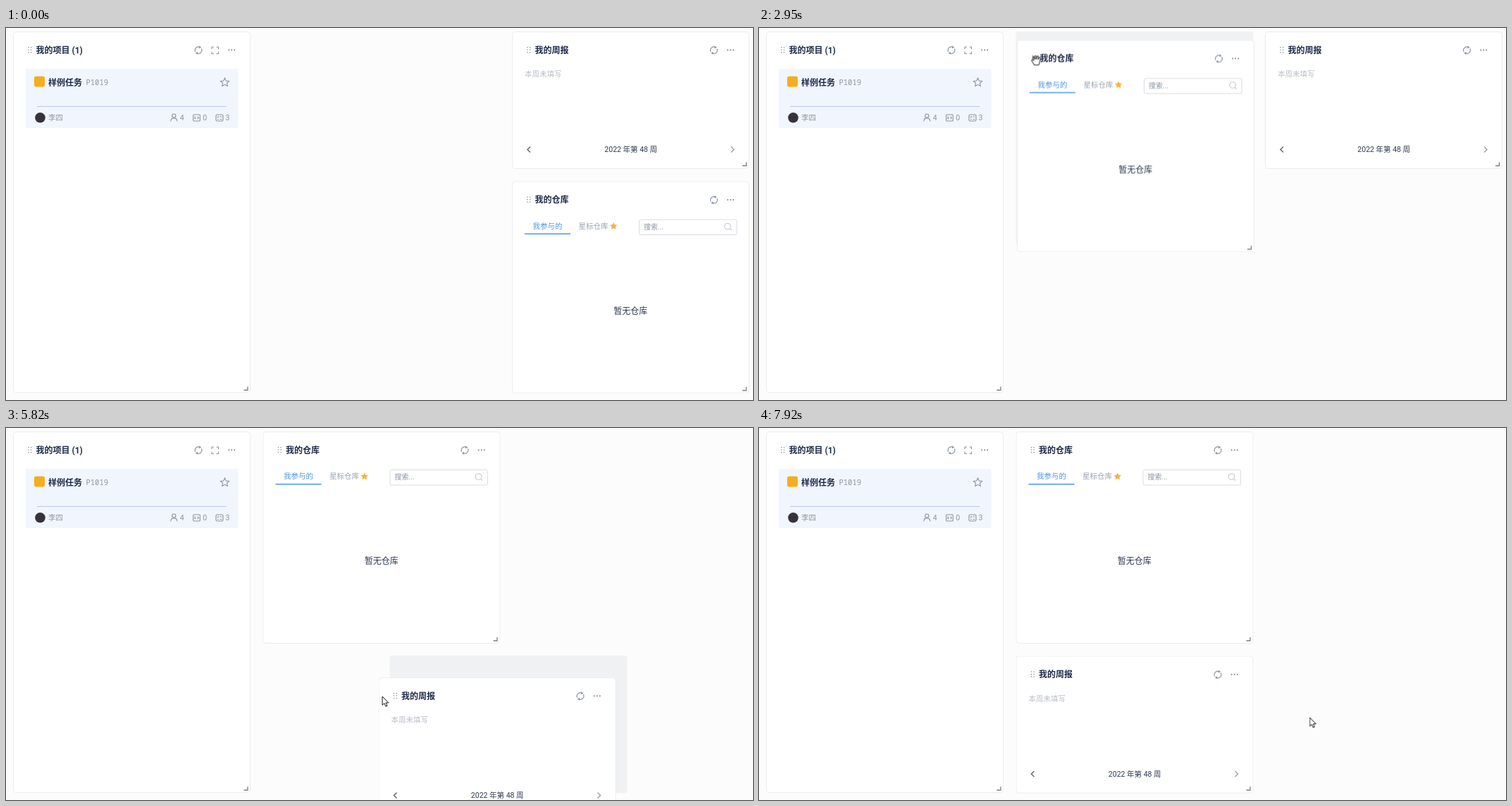
An HTML page for the animation above (8 s loop, 1060 px wide and 528 px high).

```html
<!DOCTYPE html>
<html lang="zh-CN">
<head>
<meta charset="utf-8">
<title>工作台</title>
<style>
html, body { margin: 0; width: 100%; height: 100%; overflow: hidden; background: #fcfcfc; }
body { position: relative; font: 10.5px Roboto, "Noto Sans CJK SC", "Noto Sans CJK", sans-serif; }
svg.card, .ghost, .cursor { position: absolute; left: 0; top: 0; overflow: visible; }
.card { z-index: 1; fill: none; }
.panel { fill: #fff; stroke: #ebecef; }
text { fill: #8a93a6; white-space: pre; }
.title { font-size: 12px; font-weight: 600; fill: #1d2b4a; }
.dark { fill: #2d3852; }
.pale { fill: #b9bec8; }
.mid { text-anchor: middle; }
.icon { fill: none; stroke: #8a93a3; stroke-width: 1.1; }
.dot { fill: #858e9f; stroke: none; }
.grip { stroke: #777d88; stroke-width: 1.3; }

/* One loop is 8 s, so 1% = 80 ms. */
.ghost, .cursor, .repo, .week, .hand, .arrow { animation: 8s linear infinite; }
.project { transform: translate(10px, 5px); }
.repo { z-index: 2; animation-name: repo; }
.week { animation-name: week; }
.ghost { width: 337px; border-radius: 4px; background: #f0f1f3; animation-name: ghost; }
.cursor { z-index: 9; animation-name: cursor; }
.hand, .arrow { fill: #fff; stroke: #111; stroke-linejoin: round; animation-timing-function: step-end; }
.hand { animation-name: hand; }
.arrow { animation-name: arrow; }

@keyframes repo {
  0% { transform: translate(718px, 217.5px); }
  27.15% { transform: translate(718px, 217.5px); animation-timing-function: steps(5); }
  32% { transform: translate(480px, 80px); animation-timing-function: steps(5); }
  36.85% { transform: translate(366px, 17px); }
  41.67% { transform: translate(366px, 17px); animation-timing-function: steps(4); }
  45.5%, 100% { transform: translate(364.5px, 5px); }
}
@keyframes week {
  0% { transform: translate(718px, 5px); z-index: 1; }
  64.9% { transform: translate(718px, 5px); z-index: 1; animation-timing-function: steps(4); }
  68.75% { transform: translate(650px, 150px); z-index: 3; animation-timing-function: steps(4); }
  72.6% { transform: translate(528.5px, 354px); z-index: 3; animation-timing-function: steps(3); }
  75.5% { transform: translate(474px, 344px); animation-timing-function: steps(8); }
  83.45% { transform: translate(398.5px, 331px); animation-timing-function: steps(2); }
  85.5% { transform: translate(390px, 328px); }
  86.25% { transform: translate(390px, 328px); animation-timing-function: steps(3); }
  89.25%, 100% { transform: translate(364.5px, 323.5px); z-index: 3; }
}
@keyframes ghost {
  0% { transform: translate(718px, 217.5px); height: 301px; opacity: 0; animation-timing-function: step-end; }
  28.1% { transform: translate(718px, 217.5px); opacity: 1; }
  31% { transform: translate(541px, 217.5px); }
  33.5% { transform: translate(364.5px, 217.5px); }
  36% { transform: translate(364.5px, 5px); }
  42.6% { transform: translate(364.5px, 5px); height: 301px; opacity: 1; animation-timing-function: step-end; }
  42.62% { transform: translate(718px, 5px); height: 195px; opacity: 0; animation-timing-function: step-end; }
  65.9% { transform: translate(718px, 5px); opacity: 1; }
  68.8% { transform: translate(718px, 5px); }
  70.8% { transform: translate(659px, 323px); }
  72.7% { transform: translate(548.5px, 323px); }
  75.6% { transform: translate(364.5px, 323px); }
  87.2% { transform: translate(364.5px, 323px); opacity: 1; animation-timing-function: step-end; }
  87.25%, 100% { transform: translate(364.5px, 323px); height: 195px; opacity: 0; }
}
@keyframes cursor {
  0%, 6.75% { transform: translate(977px, 514px); animation-timing-function: steps(5); }
  11.5% { transform: translate(800px, 198px); animation-timing-function: steps(5); }
  16.25% { transform: translate(746.5px, 247.5px); }
  27.15% { transform: translate(746.5px, 247.5px); animation-timing-function: steps(5); }
  32% { transform: translate(508px, 110px); animation-timing-function: steps(5); }
  36.85% { transform: translate(393.5px, 45.5px); }
  46.5% { transform: translate(393.5px, 45.5px); animation-timing-function: steps(5); }
  51.35% { transform: translate(673px, 46px); animation-timing-function: steps(5); }
  56.25% { transform: translate(738px, 31px); }
  64.9% { transform: translate(738px, 31px); animation-timing-function: steps(4); }
  68.75% { transform: translate(660px, 174px); animation-timing-function: steps(4); }
  72.6% { transform: translate(534px, 381px); animation-timing-function: steps(3); }
  75.5% { transform: translate(492px, 369px); animation-timing-function: steps(8); }
  83.45% { transform: translate(418px, 356.5px); animation-timing-function: steps(2); }
  85.5% { transform: translate(410px, 353px); }
  97.05% { transform: translate(410px, 353px); animation-timing-function: step-end; }
  97.1% { transform: translate(545px, 372px); animation-timing-function: step-end; }
  98.05% { transform: translate(690px, 395px); animation-timing-function: step-end; }
  98.95%, 100% { transform: translate(781.5px, 411px); }
}
@keyframes hand {
  0%, 47.5%, 68.75%, 97.1%, 100% { opacity: 0; }
  16.25%, 56.25%, 74.5% { opacity: 1; }
}
@keyframes arrow {
  0%, 16.25%, 56.25%, 74.5% { opacity: 0; }
  6.75%, 47.5%, 68.75%, 97.1%, 100% { opacity: 1; }
}
</style>
</head>
<body>
<svg width="0" height="0" style="position:absolute">
  <defs>
    <g id="refresh" class="icon">
      <path d="M-4.4 2.2A4.9 4.9 0 0 1 1.6-4.6M4.4-2.2A4.9 4.9 0 0 1-1.6 4.6"/>
      <path class="dot" d="M1.2-6.2 4.2-3.7 .8-2.6zM-1.2 6.2-4.2 3.7-.8 2.6z"/>
    </g>
    <path id="star" d="M0-6 1.8-2 6.1-1.6 2.9 1.3 3.8 5.5 0 3.3-3.8 5.5-2.9 1.3-6.1-1.6-1.8-2z"/>
    <g id="head" class="dot">
      <path d="M22 22.5h0M25.6 22.5h0M22 26h0M25.6 26h0M22 29.5h0M25.6 29.5h0" stroke="#7f899c" stroke-width="1.6" stroke-linecap="round"/>
      <circle cx="306.2" cy="26.3" r="1.1"/><circle cx="310.2" cy="26.3" r="1.1"/><circle cx="314.2" cy="26.3" r="1.1"/>
    </g>
    <path id="grip" class="grip" d="M0-5V0H-5.5"/>
  </defs>
</svg>

<div class="ghost"></div>

<svg class="card project" width="337" height="513">
  <rect class="panel" x=".5" y=".5" width="336" height="512" rx="4"/>
  <use href="#head"/>
  <text class="title" x="32.5" y="30.5">我的项目 (1)</text>
  <use href="#refresh" x="263" y="26.5"/>
  <path class="icon" d="M282 25v-3h3M288.5 22h3v3M291.5 28.5v3h-3M285 31.5h-3v-3"/>
  <rect x="18" y="53" width="301.5" height="84" rx="3" fill="#f1f5fd"/>
  <rect x="30" y="63.5" width="15" height="15" rx="3" fill="#f6ad1f"/>
  <text class="title" x="50" y="76.5">样例任务</text>
  <text x="103.5" y="76" style="font-family:'Noto Sans Mono','Liberation Mono',monospace">P1019</text>
  <use href="#star" class="icon" x="300.5" y="72"/>
  <path d="M34 106.4H303" stroke="#b9c3e6"/>
  <circle cx="38.5" cy="122.3" r="7.3" fill="#34323f"/>
  <text x="50" y="126">李四</text>
  <g class="icon">
    <circle cx="228.3" cy="119.6" r="2.6"/>
    <path d="M223.8 127.5c0-6.2 9-6.2 9 0"/>
    <rect x="255.7" y="118" width="9.6" height="9" rx="1"/>
    <path d="M259.3 120.8l-1.7 1.7 1.7 1.7M261.7 120.8l1.7 1.7-1.7 1.7"/>
    <rect x="288" y="118" width="10" height="9" rx="1.5"/>
    <path d="M290 121l.8.8 1.2-1.5M293.5 121h2.8M290 124.7h1.8M293.5 124.7h2.8"/>
  </g>
  <text x="236.8" y="126">4</text>
  <text x="269.2" y="126">0</text>
  <text x="301.5" y="126">3</text>
  <use href="#grip" x="333" y="509"/>
</svg>

<svg class="card week" width="337" height="195">
  <rect class="panel" x=".5" y=".5" width="336" height="194" rx="4"/>
  <use href="#head"/>
  <text class="title" x="32.5" y="30.5">我的周报</text>
  <use href="#refresh" x="286.5" y="26.5"/>
  <text class="pale" x="18" y="64">本周未填写</text>
  <path d="M26 163.5l-4 4 4 4" stroke="#656d7e" stroke-width="1.6"/>
  <path d="M311 163.5l4 4-4 4" stroke="#a0a6b2" stroke-width="1.6"/>
  <text class="dark mid" x="168.7" y="171.3">2022 年第 48 周</text>
  <use href="#grip" x="332.5" y="190.5"/>
</svg>

<svg class="card repo" width="337" height="301">
  <rect class="panel" x=".5" y=".5" width="336" height="300" rx="4"/>
  <use href="#head"/>
  <text class="title" x="32.5" y="30.5">我的仓库</text>
  <use href="#refresh" x="286.5" y="26.5"/>
  <text x="29.5" y="67" style="fill:#4c97e8">我参与的</text>
  <path d="M18 74.7H83" stroke="#4c97e8" stroke-width="1.5"/>
  <text x="94.5" y="67" style="fill:#9aa2b3">星标仓库</text>
  <use href="#star" fill="#f3b440" transform="translate(144.2 63.5) scale(.88)"/>
  <rect x="180.5" y="54.5" width="138.5" height="21.5" rx="2" stroke="#d9dce2"/>
  <text x="187" y="68.3" style="font-size:10px">搜索...</text>
  <g stroke="#c3c8d0" stroke-width="1.1"><circle cx="306" cy="64" r="4.3"/><path d="M309.2 67.2l2.5 2.5"/></g>
  <text class="dark mid" x="168.2" y="188.3" style="font-size:12px">暂无仓库</text>
  <use href="#grip" x="332.5" y="297"/>
</svg>

<svg class="cursor" width="1" height="1">
  <path class="arrow" d="M0 0V12.3L2.9 9.7 4.9 14.2 6.9 13.3 5 9H8.8z"/>
  <path class="hand" d="M-3 7-6.5 1Q-7-1-5-.6L-3.5 1-5-4Q-5-5.7-3.6-5L-2-1-2.2-5.5Q-1.2-7.5-.2-5.6L.2-1.2 1-5.3Q2.4-7 3.1-5L2.6-1 4.3-3.8Q6-4.6 6-2.8L5 2 3.6 7z"/>
</svg>
</body>
</html>
```
